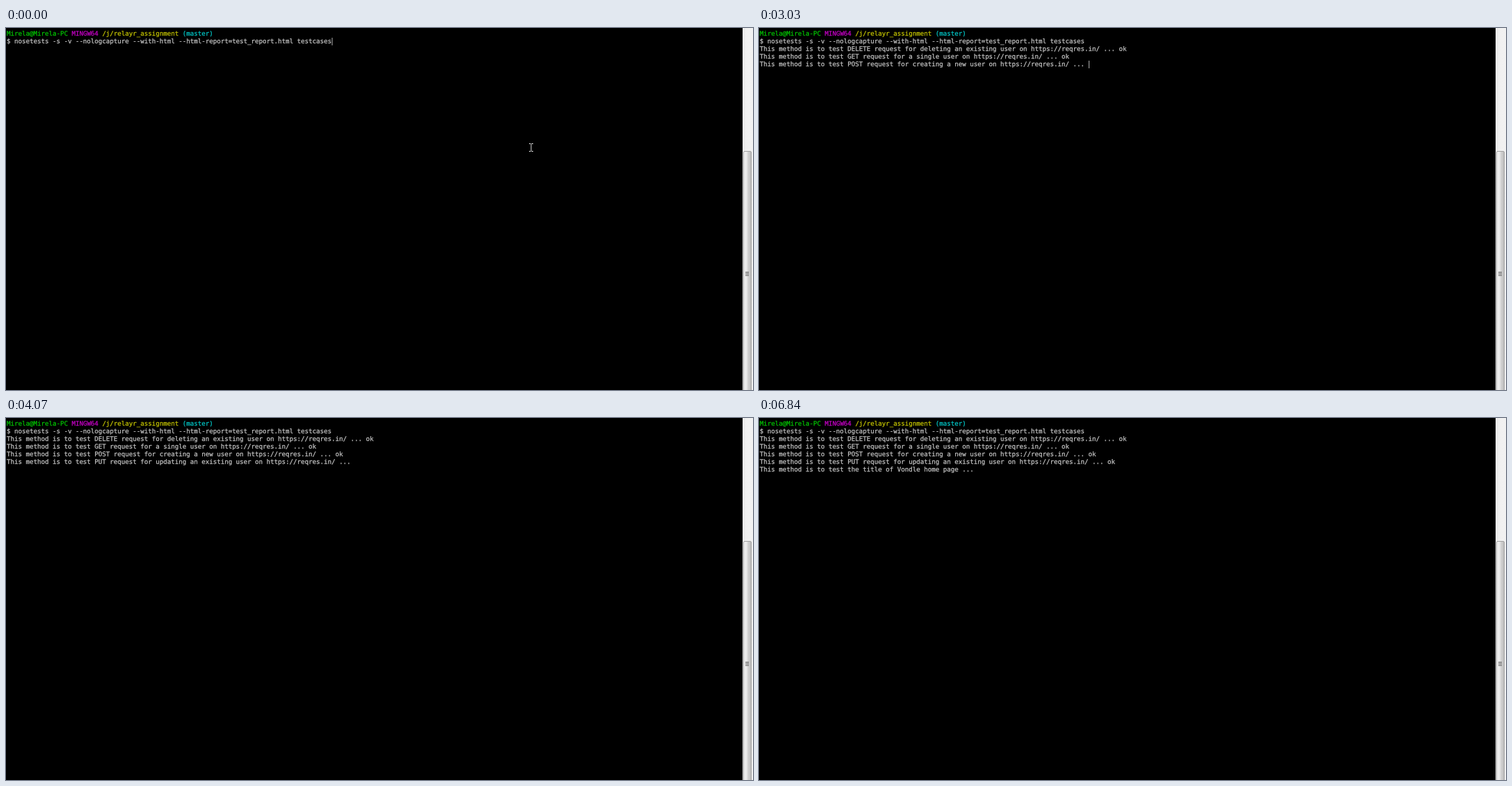
Write an HTML page that moves like this. It is 1074 px wide and 521 px high and loops after 8000 ms.

```html
<!DOCTYPE html>
<html lang="en">
<meta charset="utf-8">
<title>Test run</title>
<style>
  html, body { margin: 0; width: 100%; height: 100%; overflow: hidden; background: #000; }
  #term {
    position: absolute; left: 1px; top: 4px; margin: 0; color: #c4c4c4;
    font: 9.136px/11px "DejaVu Sans Mono", monospace;
    -webkit-text-stroke: .25px; text-rendering: geometricPrecision; font-variant-ligatures: none;
  }
  .user { color: #00c400; }
  .sys { color: #c400c4; }
  .path { color: #c4c400; }
  .branch { color: #00c4c4; }
  svg { position: absolute; left: 0; top: 0; }
</style>
<pre id="term"><span class="user">Mirela@Mirela-PC</span> <span class="sys">MINGW64</span> <span class="path">/j/relayr_assignment</span> <span class="branch">(master)</span>
$ nosetests -s -v --nologcapture --with-html --html-report=test_report.html testcases
<span id="out"></span></pre>
<svg width="1074" height="521">
  <defs>
    <linearGradient id="track">
      <stop offset="0" stop-color="#e6e6e6"/><stop offset=".3" stop-color="#f0f0f0"/><stop offset="1" stop-color="#f2f2f2"/>
    </linearGradient>
    <linearGradient id="thumb">
      <stop offset="0" stop-color="#f4f4f4"/><stop offset=".45" stop-color="#e6e6e6"/>
      <stop offset=".5" stop-color="#d6d6d6"/><stop offset="1" stop-color="#bcbcbc"/>
    </linearGradient>
  </defs>
  <rect id="caret" width=".92" height="11" fill="#bfbfbf"/>
  <path id="pointer" d="M752 166.5h2.5m1 0h2.5M755 167v10M752 177.5h2.5m1 0h2.5" fill="none" stroke="#ddd"/>
  <rect x="1059" width="15" height="521" fill="url(#track)"/>
  <rect x="1060.5" y="177.5" width="11" height="350" rx="1.5" fill="url(#thumb)" stroke="#a0a0a0"/>
  <path d="M1063 351.5h5m-5 2.3h5m-5 2.3h5" stroke="#555"/>
</svg>
<script>
  const LOOP = 8000, COL = 5.5, ROW = 11;
  const tests = [
    "DELETE request for deleting an existing user on https://reqres.in/",
    "GET request for a single user on https://reqres.in/",
    "POST request for creating a new user on https://reqres.in/",
    "PUT request for updating an existing user on https://reqres.in/",
    "the title of Vondle home page",
  ].map(name => `This method is to test ${name} ... `);

  // shown: tests listed (all but the last have passed); caret: [column, row]
  const steps = [
    { at: 0, shown: 0, caret: [85, 1] },
    { at: 1000, shown: 0, caret: [0, 2] },
    { at: 2020, shown: 1 },
    { at: 3030, shown: 3, caret: [86, 4] },
    { at: 4070, shown: 4 },
    { at: 5100, shown: 5 },
  ];

  const [out, caret, pointer] = ["out", "caret", "pointer"].map(id => document.getElementById(id));
  let current;

  function show(step) {
    out.textContent = tests.slice(0, step.shown).join("ok\n");
    caret.style.display = step.caret ? "" : "none";
    if (step.caret) {
      const [col, row] = step.caret;
      caret.setAttribute("x", 1 + col * COL);
      caret.setAttribute("y", 3 + row * ROW);
    }
    pointer.style.display = step.at === 0 ? "" : "none";
  }

  function tick(now) {
    const t = now % LOOP;
    const step = steps.findLast(s => s.at <= t) || steps[0];
    if (step !== current) show(current = step);
    requestAnimationFrame(tick);
  }
  tick(performance.now());
</script>
</html>
```
